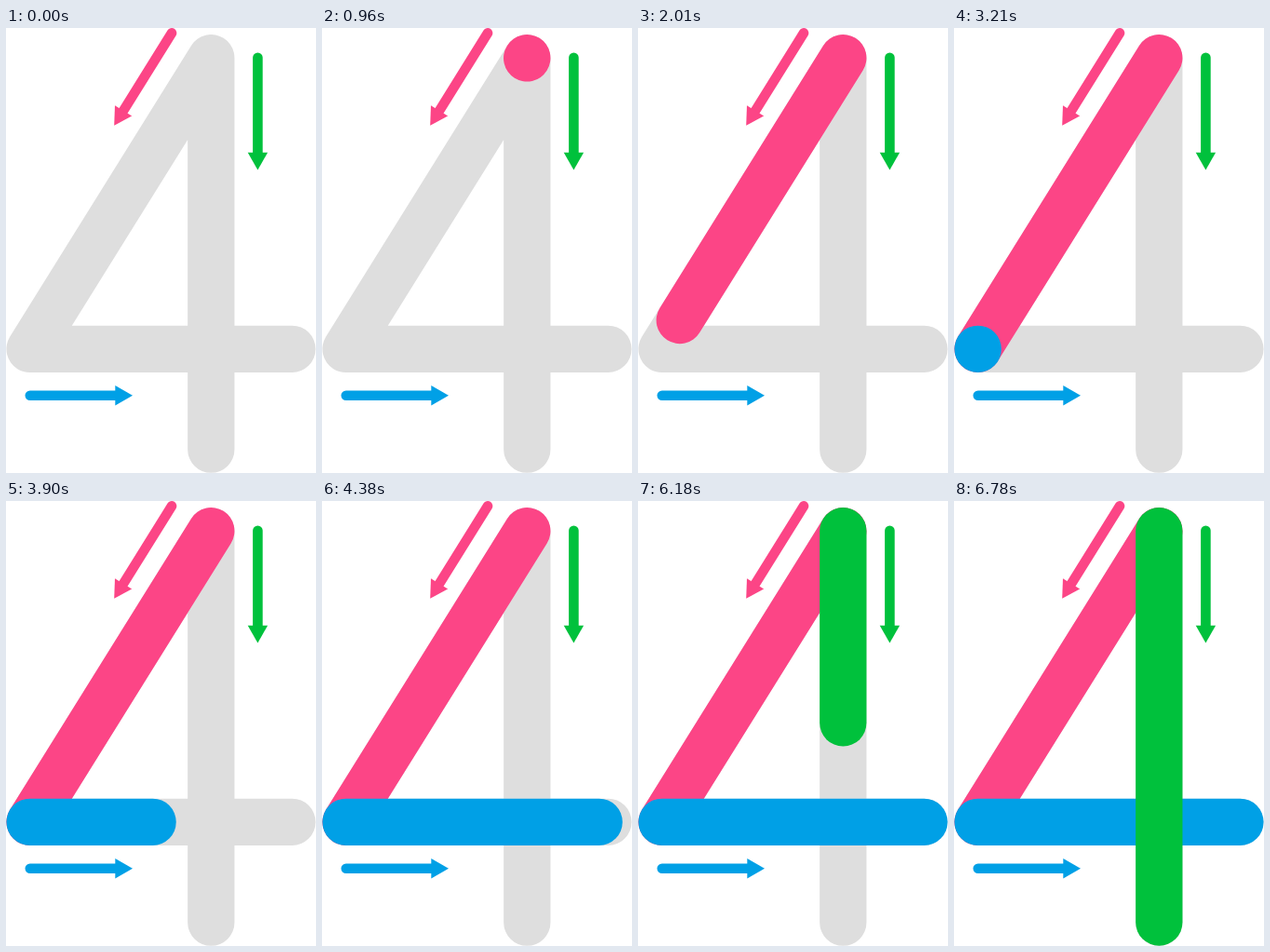
These frames come from a looping animation (333 by 478 pixels, 8000 ms). An HTML page:

```html
<!DOCTYPE html>
<html lang="en">
<head>
<meta charset="utf-8">
<title>Writing the number 4</title>
<style>
  html, body { margin: 0; width: 100%; height: 100%; overflow: hidden; background: #fff; }
  svg { display: block; width: 333px; height: 478px; }
  .pink { stroke: #fc4586; fill: #fc4586; }
  .blue { stroke: #00a0e6; fill: #00a0e6; }
  .green { stroke: #00c13c; fill: #00c13c; }
  .base { stroke: #dedede; fill: none; }
  .base, .pen { stroke-width: 50.3; stroke-linecap: round; stroke-linejoin: round; }
  .pen { visibility: hidden; }
  .arrow { stroke-width: 10.6; stroke-linecap: round; }
  .head { stroke: none; }
</style>
</head>
<body>
<svg viewBox="0 0 333 478">
  <defs>
    <path id="head" class="head" d="M0 0L-18.7 -10.7V10.7Z"/>
  </defs>

  <path class="base" d="M220.3 32.2L25.6 344.8H307.4M220.3 32.2V452.7"/>

  <line class="pen pink"/>
  <line class="pen blue"/>
  <line class="pen green"/>

  <!-- each arrow has its tip at the local origin, pointing right -->
  <g class="arrow pink" transform="translate(116.2 104.7) rotate(121.9)">
    <path d="M-117 0H-17"/><use href="#head"/>
  </g>
  <g class="arrow blue" transform="translate(136 394.7)">
    <path d="M-110.2 0H-17"/><use href="#head"/>
  </g>
  <g class="arrow green" transform="translate(270.4 152.4) rotate(90)">
    <path d="M-120.6 0H-17"/><use href="#head"/>
  </g>
</svg>
<script>
  const LOOP = 8000, STEP = 30, DRAW = 1335;

  // show: when the dot appears, start: when it begins to move
  const strokes = [
    { name: 'pink', from: [220.3, 32.2], to: [25.6, 344.8], show: 930, start: 930 },
    { name: 'blue', from: [25.6, 344.8], to: [307.4, 344.8], show: 3180, start: 3197 },
    { name: 'green', from: [220.3, 32.2], to: [220.3, 452.7], show: 5460, start: 5460 }
  ];

  for (const s of strokes) {
    s.line = document.querySelector('.pen.' + s.name);
    s.line.setAttribute('x1', s.from[0]);
    s.line.setAttribute('y1', s.from[1]);
  }

  // cubic-bezier(.48, 0, .64, 1)
  function ease(x) {
    if (x <= 0) return 0;
    if (x >= 1) return 1;
    let lo = 0, hi = 1, s;
    for (let i = 0; i < 24; i++) {
      s = (lo + hi) / 2;
      const r = 1 - s;
      const bx = 3 * r * r * s * 0.48 + 3 * r * s * s * 0.64 + s * s * s;
      if (bx < x) lo = s; else hi = s;
    }
    return s * s * (3 - 2 * s);
  }

  function render(now) {
    // the drawing advances in held steps
    const t = Math.floor((now % LOOP) / STEP) * STEP;
    for (const { line, from, to, show, start } of strokes) {
      const p = Math.max(ease((t - start) / DRAW), 0.0005);
      line.setAttribute('x2', from[0] + (to[0] - from[0]) * p);
      line.setAttribute('y2', from[1] + (to[1] - from[1]) * p);
      line.style.visibility = t >= show ? 'visible' : 'hidden';
    }
  }

  function frame() {
    render(performance.now());
    requestAnimationFrame(frame);
  }
  frame();
</script>
</body>
</html>
```
